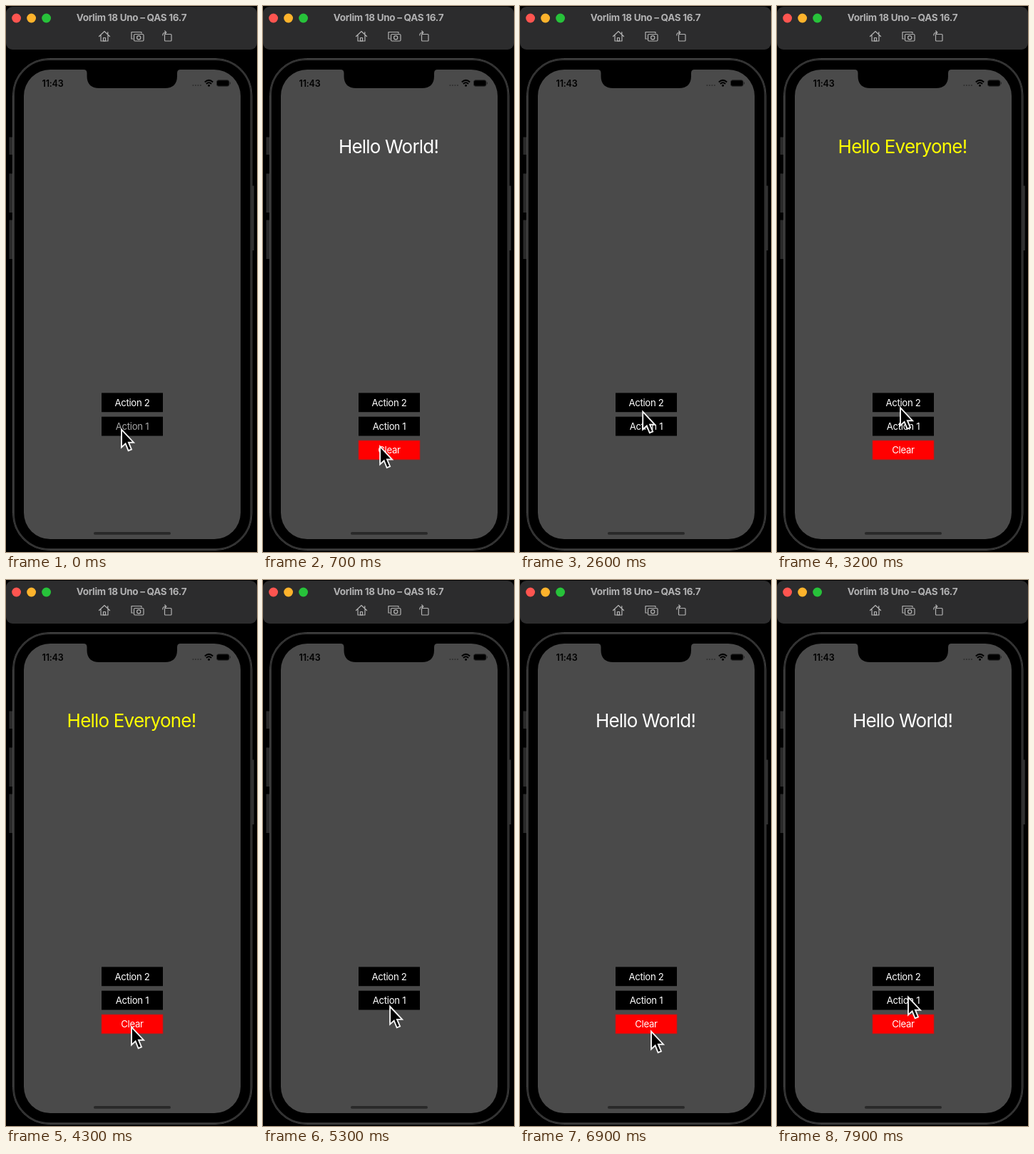
Write an HTML page that moves like this. It is 352 by 764 pixels and loops after 8 s.

```html
<!DOCTYPE html>
<html lang="en">
<head>
<meta charset="utf-8">
<title>Simulator demo</title>
<style>
  html, body { margin: 0; width: 100%; height: 100%; overflow: hidden; background: #000; }
  svg { display: block; width: 352px; height: 764px; }
  text { font-family: Inter, Roboto, sans-serif; text-anchor: middle; }
  .label { font-size: 13.2px; letter-spacing: -.3px; fill: #fff; }
  #greeting { font-size: 26px; letter-spacing: -.8px; }
  .icon { fill: none; stroke: #b2b2b2; stroke-width: 1.2; stroke-linejoin: round; stroke-linecap: round; }
  .side { fill: #2a2a2a; }
</style>
</head>
<body>
<svg viewBox="0 0 352 764">
  <!-- window bar -->
  <rect y="1" width="352" height="60" rx="9" fill="#2c2c2d"/>
  <g id="lights"></g>
  <text x="176" y="21.2" font-size="13.5" font-weight="700" letter-spacing="-.3" fill="#b1b1b2">Vorlim 18 Uno – QAS 16.7</text>
  <g class="icon">
    <path d="M130.5 42.5 138 35.5 145.5 42.5M133 41V49H143V41M142.8 39.5V36.5"/>
    <rect x="136.500" y="44.500" width="3" height="4.500"/>
    <path d="M178 46H176V36.500H190V38"/>
    <rect x="179.500" y="39.500" width="13.500" height="9.500" rx="1.500"/>
    <circle cx="186.200" cy="44.300" r="2.600"/>
    <rect x="222.500" y="39.500" width="9.500" height="9.500" rx="1"/>
    <path d="M219.800 41Q219.800 37 224.500 37M222.800 35 224.800 37 222.800 39"/>
  </g>

  <!-- phone -->
  <rect class="side" x="4.500" y="183.500" width="6" height="24.500"/>
  <rect class="side" x="4.500" y="234.500" width="6" height="54.500"/>
  <rect class="side" x="4.500" y="299.500" width="6" height="54.500"/>
  <rect class="side" x="342" y="251.500" width="6" height="90.500"/>
  <rect x="9.500" y="73.500" width="335.500" height="688" rx="51" fill="#000" stroke="#484848"/>
  <rect x="11" y="75" width="332.500" height="685" rx="49.500" fill="none" stroke="#333" stroke-width="2"/>
  <rect x="25" y="89" width="304" height="657" rx="37" fill="#4a4a4a"/>
  <path d="M109 88V89Q113.500 89 113.500 94V98Q113.500 115 131 115H222.500Q240 115 240 98V94Q240 89 244.500 89V88Z"/>
  <text x="65.500" y="112.500" font-size="12.5" font-weight="600" letter-spacing="-.2">11:43</text>
  <path d="M261.500 111H274" stroke="#2b2b2b" stroke-width="1.600" stroke-dasharray="1.800 1.700"/>
  <path d="M278.800 106.400Q284.500 101.400 290.200 106.400M280.900 108.900Q284.500 105.700 288.100 108.900" fill="none" stroke="#000" stroke-width="2"/>
  <circle cx="284.500" cy="111.300" r="1.500"/>
  <rect x="295.500" y="103.800" width="17.500" height="8.400" rx="2.500" stroke="#292929"/>
  <path d="M314.500 106.600V109.400" stroke="#292929"/>
  <rect x="123" y="736" width="108" height="3.800" rx="1.900" fill="#292929"/>

  <!-- app -->
  <text id="greeting" x="176" y="206"></text>
  <g id="buttons"></g>
  <path id="cursor" d="M1 2.600V27.500L6.600 22.400 10.600 32.200 15 30.400 10.900 20.700H18Z" stroke="#f2f2f2" stroke-width="1.900"/>
</svg>
<script>
const LOOP = 8000, STEP = 100, PRESS = 100;
const $ = id => document.getElementById(id);

$("lights").innerHTML = ["#fe5550", "#fdb32c", "#27c23a"]
  .map((color, i) => `<circle cx="${14.6 + 21 * i}" cy="17" r="6.4" fill="${color}"/>`).join("");

$("buttons").innerHTML = ["Action 2", "Action 1", "Clear"].map((name, i) => `
  <g id="${name}" transform="translate(134 ${541.4 + 33.3 * i})">
    <rect width="86" height="26.8" ${name === "Clear" ? 'fill="#f00" stroke="#a22" stroke-width=".8"' : ""}/>
    <text class="label" x="43" y="18.3">${name}</text>
  </g>`).join("");

const greetings = {
  "Action 1": ["Hello World!", "#fff"],
  "Action 2": ["Hello Everyone!", "#ff0"],
  "Clear": ["", "#fff"]
};

const presses = [
  { at: 0, name: "Action 1" },
  { at: 1900, name: "Clear" },
  { at: 2900, name: "Action 2" },
  { at: 5000, name: "Clear" },
  { at: 5800, name: "Action 1" }
];

// Cursor glides, each starting where the previous one ended
const moves = [
  { at: 500, time: 900, x: 165, y: 635 },
  { at: 1400, time: 300, x: 162, y: 630 },
  { at: 2200, time: 700, x: 172, y: 559.5 },
  { at: 3600, time: 700, x: 175, y: 623 },
  { at: 5200, time: 300, x: 178, y: 582 },
  { at: 6400, time: 500, x: 183, y: 629 },
  { at: 7700, time: 200, x: 183, y: 581 }
];

const easeOut = u => 1 - (1 - u) ** 3;

function cursorAt(t) {
  let x = 161, y = 590;
  for (const move of moves) {
    const k = easeOut(Math.min(1, Math.max(0, (t - move.at) / move.time)));
    x += (move.x - x) * k;
    y += (move.y - y) * k;
  }
  return `translate(${x} ${y})`;
}

function render(t) {
  $("cursor").setAttribute("transform", cursorAt(t));

  const held = presses.find(p => t >= p.at && t < p.at + PRESS);
  for (const name in greetings)
    $(name).lastElementChild.setAttribute("opacity", held?.name === name ? 0.65 : 1);

  const done = presses.findLast(p => t >= p.at + PRESS);
  const [text, color] = greetings[done ? done.name : "Clear"];
  $("greeting").textContent = text;
  $("greeting").style.fill = color;
  $("Clear").setAttribute("visibility", text ? "visible" : "hidden");
}

const start = performance.now();
function tick() {
  const t = (performance.now() - start) % LOOP;
  render(Math.floor(t / STEP) * STEP);
  requestAnimationFrame(tick);
}
tick();
</script>
</body>
</html>
```
